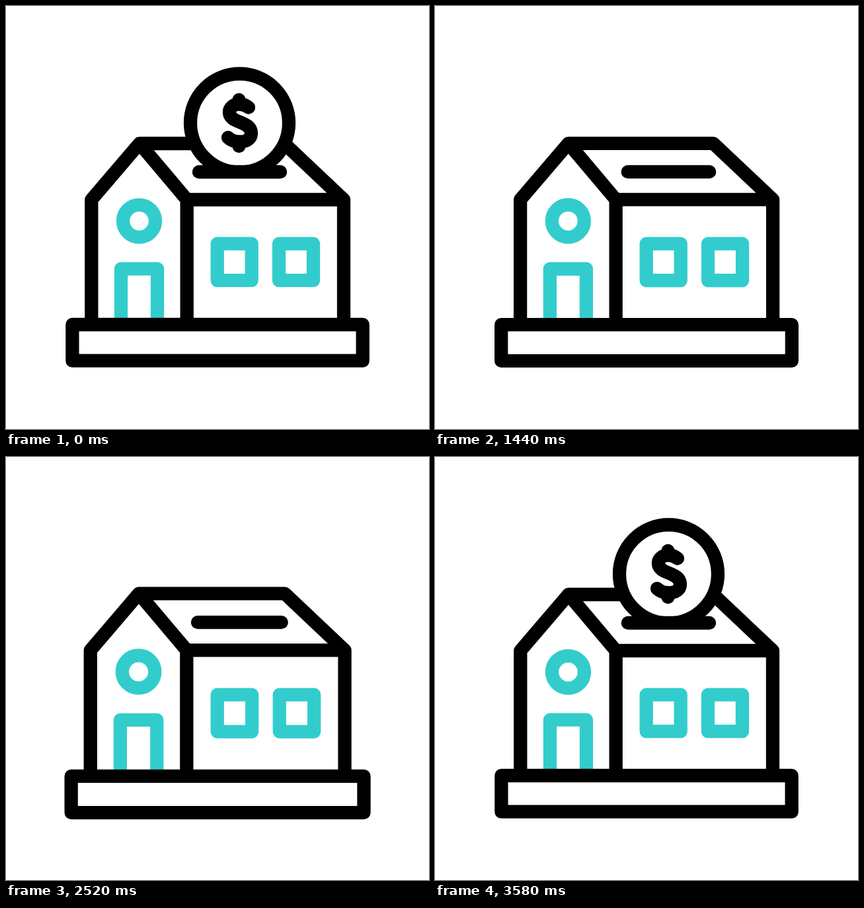
Animation of 640x640 px, one loop 3600 ms. Source, as an HTML page without scripts:

```html
<!DOCTYPE html>
<html lang="en">
<head>
<meta charset="utf-8">
<title>House savings</title>
<style>
@property --swell { syntax: "<number>"; inherits: true; initial-value: 1; }
@property --slot { syntax: "<number>"; inherits: true; initial-value: 1; }
@property --hop { syntax: "<length>"; inherits: true; initial-value: 0px; }
@property --coin-y { syntax: "<length>"; inherits: true; initial-value: 177px; }
@property --coin-size { syntax: "<number>"; inherits: true; initial-value: 1; }

html, body { margin: 0; width: 100%; height: 100%; overflow: hidden; background: #fff; }

/* The default easings are the house's slow swell and the coin's free fall. */
svg {
  --line: 20.3px;
  display: block;
  width: 100%;
  height: 100%;
  fill: none;
  stroke: #000;
  stroke-linecap: round;
  stroke-linejoin: round;
  animation: 3.6s infinite linear;
  animation-name: swell, slot, hop, coin-y, coin-size;
  animation-timing-function: cubic-bezier(.4, .3, .8, .7), linear, linear,
    cubic-bezier(.333, 0, .667, .333), linear;
}

/* Line weight stays constant while shapes scale. */
.house {
  transform-origin: 320px 368px;
  transform: translateY(var(--hop)) scale(var(--swell));
  stroke-width: calc(var(--line) / var(--swell));
}
.trim { stroke: #3cc; }
.slot {
  x: calc(373px - 81px * var(--slot));
  y: 251px;
  width: calc(123px * var(--slot));
  height: .01px;
}
.coin {
  transform: translate(353.5px, var(--coin-y)) scale(var(--coin-size));
  stroke-width: calc(var(--line) / var(--coin-size));
}

@keyframes swell {
  0%, 13.9% { --swell: 1; }
  31.1% { --swell: 1.068; animation-timing-function: ease-in-out; }
  39.7% { --swell: 1; }
  58.6% { --swell: 1.068; animation-timing-function: ease-in-out; }
  67.2% { --swell: 1; }
  85.8% { --swell: 1.068; animation-timing-function: linear; }
  98.3%, 100% { --swell: 1; }
}
@keyframes slot {
  0%, 15% { --slot: 1; }
  31.1% { --slot: 1.14; }
  39.7% { --slot: 1; }
  58.6% { --slot: 1.14; }
  67.2% { --slot: 1; }
  85% { --slot: 1.14; }
  90%, 100% { --slot: 1; }
}
@keyframes hop {
  0% { --hop: 0px; }
  85.8% { --hop: 0px; animation-timing-function: ease-out; }
  90% { --hop: -17.5px; animation-timing-function: ease-in-out; }
  97%, 100% { --hop: 0px; }
}
@keyframes coin-y {
  0% { --coin-y: 177px; }
  6.1% { --coin-y: 177px; animation-timing-function: ease-in-out; }
  15.6% { --coin-y: 115px; }
  25.1% { --coin-y: 340px; animation-timing-function: step-end; }
  44.4% { --coin-y: -100px; }
  57.8% { --coin-y: 340px; }
  85% { --coin-y: 340px; animation-timing-function: ease-out; }
  89.6% { --coin-y: 26px; animation-timing-function: cubic-bezier(.35, .2, .7, .75); }
  99.2%, 100% { --coin-y: 177px; }
}
@keyframes coin-size {
  0% { --coin-size: 1; }
  6.1% { --coin-size: 1; animation-timing-function: ease-in-out; }
  15.6%, 89.6% { --coin-size: .855; animation-timing-function: cubic-bezier(.35, .2, .7, .75); }
  99.2%, 100% { --coin-size: 1; }
}
</style>
</head>
<body>
<svg viewBox="0 0 640 640">
  <clipPath id="above-slot"><rect width="640" height="248"/></clipPath>

  <g class="house">
    <g class="trim">
      <circle cx="201.5" cy="325.3" r="24.5"/>
      <path d="M174 482V397.7H229V482" stroke-linecap="butt"/>
      <rect x="319.7" y="359.7" width="52" height="55.5"/>
      <rect x="413" y="359.7" width="52" height="55.5"/>
    </g>
    <path d="M129.3 482V293L202 208L273.7 293V482M202 208H421L511 293M273.7 293H511V482"/>
    <rect x="100.4" y="482" width="439.3" height="54.7" fill="#fff"/>
  </g>

  <g clip-path="url(#above-slot)">
    <g class="coin">
      <circle r="74.5" fill="#fff"/>
      <path d="M13.5-23.5C10-26.5 5-28.5-1-28.5C-9-28.5-15.500-23-15.500-16.500C-15.500-8-8-4.500 0-1.500C9 2 17.500 6 17.500 15.500C17.500 24 10 28.500 0 28.500C-8 28.500-13.500 26-17.500 22M-1-35V-28.500M-1 28.500V35"/>
    </g>
  </g>

  <g class="house"><rect class="slot"/></g>
</svg>
</body>
</html>
```
